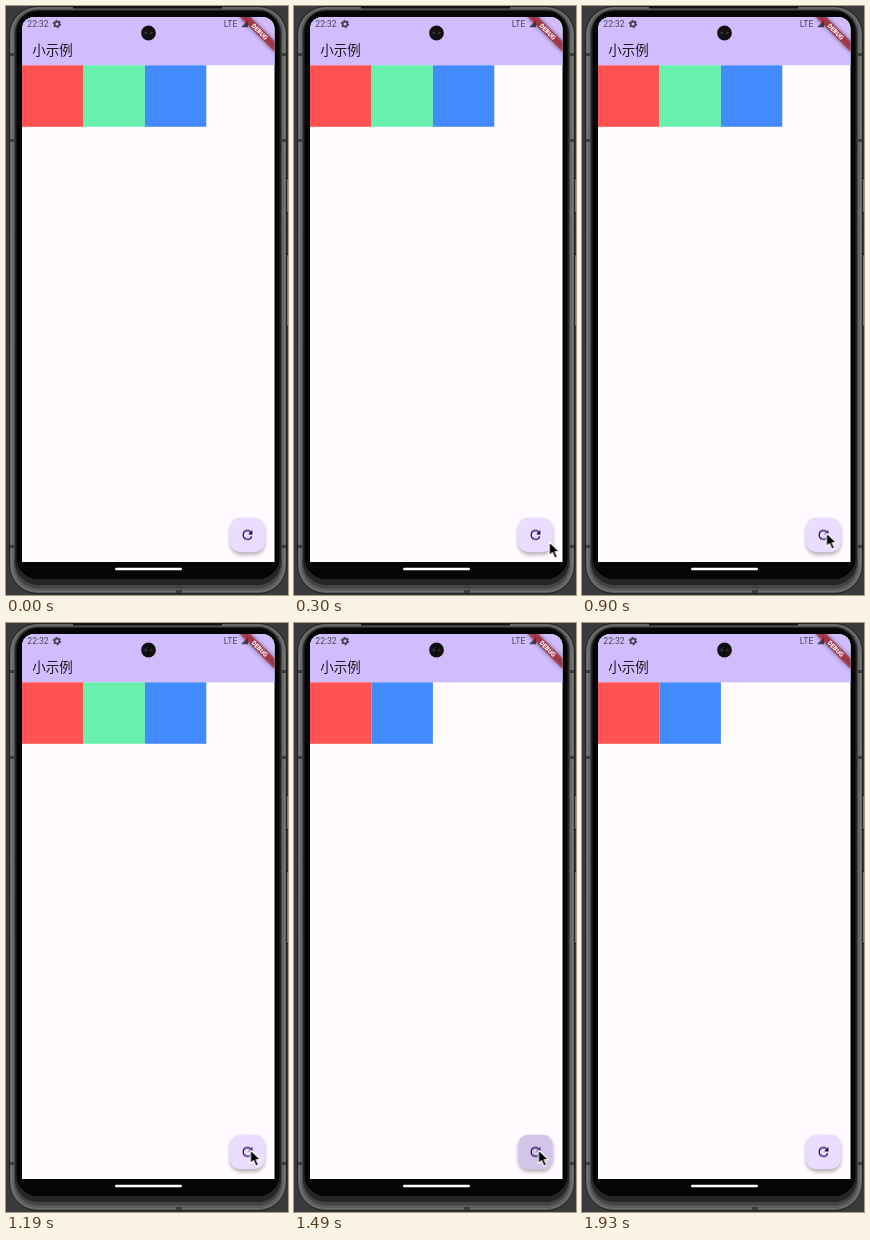
An HTML page for the animation above (4.87 s loop, 282 px wide and 589 px high).

```html
<!DOCTYPE html>
<html lang="zh-CN">
<head>
<meta charset="utf-8">
<title>小示例</title>
<style>
  html, body { margin: 0; width: 100%; height: 100%; overflow: hidden; background: #3a3a3c; }
  svg { display: block; width: 282px; height: 589px; }
  text { font-family: Roboto, sans-serif; }
  .title { font: 13.5px "Noto Sans CJK SC", "Noto Sans CJK", sans-serif; fill: #1d1b1e; }
  .status { font-size: 8.6px; fill: #4a4358; }
  .debug { font-size: 6.2px; font-weight: 900; fill: #fff; text-anchor: middle; }
  #cursor, #tap, #ripple, #pressed { opacity: 0; }
</style>
</head>
<body>
<svg viewBox="0 0 282 589">
  <defs>
    <linearGradient id="metal" x2="0" y2="1">
      <stop offset="0" stop-color="#565656"/>
      <stop offset=".05" stop-color="#6a6a6a"/>
      <stop offset=".95" stop-color="#666"/>
      <stop offset="1" stop-color="#595959"/>
    </linearGradient>
    <radialGradient id="ink" gradientUnits="userSpaceOnUse" cx="243" cy="529" r="19">
      <stop offset="0" stop-color="#cdbde6"/>
      <stop offset=".6" stop-color="#d3c4ea"/>
      <stop offset="1" stop-color="#e6d9fb"/>
    </radialGradient>
    <clipPath id="screen"><path d="M16 556V23a12 12 0 0 1 12-12H256.5a12 12 0 0 1 12 12V556Z"/></clipPath>
    <clipPath id="fabClip"><rect x="224.2" y="511.8" width="34.6" height="34.4" rx="9.8"/></clipPath>
    <filter id="soft" x="-50%" y="-50%" width="200%" height="200%"><feGaussianBlur stdDeviation="2"/></filter>
  </defs>

  <!-- device -->
  <rect width="282" height="589" fill="#3a3a3c"/>
  <g fill="#161616">
    <rect x="279.5" y="172" width="2.5" height="35"/>
    <rect x="279.5" y="248" width="2.5" height="73"/>
  </g>
  <path d="M281.5 173V206M281.5 249V320" stroke="#777"/>
  <rect x="3.5" y=".5" width="277" height="587" rx="28" fill="url(#metal)" stroke="#222"/>
  <rect x="5.5" y="2" width="273" height="583.5" rx="26" fill="none" stroke="#7b7b7b" stroke-width=".8"/>
  <rect x="8" y="3.5" width="268" height="579" rx="24" fill="#444"/>
  <rect x="9" y="4" width="266" height="575" rx="23" fill="#252525"/>
  <rect x="10.5" y="5" width="263" height="568" rx="21" fill="#050505"/>
  <path d="M67 1.5H216" stroke="#111" stroke-width="2"/>
  <g fill="#3b3b3b">
    <rect x="4" y="47" width="4" height="3"/>
    <rect x="4" y="133" width="4" height="3"/>
    <rect x="276" y="133" width="4" height="3"/>
    <rect x="276" y="47" width="4" height="3"/>
    <rect x="4" y="539" width="4" height="3"/>
    <rect x="276" y="539" width="4" height="3"/>
    <rect x="170" y="584" width="6" height="3"/>
  </g>
  <rect x="109" y="561.8" width="67" height="2.4" rx="1.2" fill="#fff"/>

  <!-- app -->
  <g clip-path="url(#screen)">
    <rect x="16" y="11" width="253" height="545" fill="#fffbff"/>
    <rect x="16" y="11" width="253" height="48.3" fill="#d1bcfe"/>
    <text class="status" x="21.3" y="21.2">22:32</text>
    <circle cx="51" cy="18" r="2.4" fill="none" stroke="#4a4358" stroke-width="1.7"/>
    <circle cx="51" cy="18" r="3.6" fill="none" stroke="#4a4358" stroke-width="1.2" stroke-dasharray="1.9 1.87"/>
    <text class="status" x="217.8" y="21.2">LTE</text>
    <path d="M235 21.2H242V14.2Z" fill="#4a4358"/>
    <text class="title" x="26.3" y="48.8">小示例</text>

    <rect x="16" y="59.3" width="61.5" height="61.5" fill="#ff5252"/>
    <rect id="middle" x="77.5" y="59.3" width="61.4" height="61.5" fill="#69f0ae"/>
    <rect id="last" x="138.9" y="59.3" width="61.4" height="61.5" fill="#448aff"/>

    <g transform="translate(268.5 11) rotate(45)">
      <rect x="-24.5" y="17.2" width="49" height="7.4" opacity=".5" filter="url(#soft)"/>
      <rect x="-24.5" y="17.2" width="49" height="7.4" fill="#b71c1c" fill-opacity=".63"/>
      <text class="debug" x="0" y="23.1">DEBUG</text>
    </g>
  </g>
  <circle cx="142.5" cy="27" r="7.4" fill="#101010"/>
  <circle cx="139.8" cy="27" r="1.5" fill="#333"/>
  <circle cx="145.2" cy="27" r="1.5" fill="#292929"/>

  <!-- button -->
  <rect x="224.5" y="514.5" width="34" height="34" rx="10" opacity=".34" filter="url(#soft)"/>
  <g clip-path="url(#fabClip)">
    <rect x="224" y="511" width="36" height="36" fill="#eaddff"/>
    <circle id="tap" cx="246.5" cy="526.5" r="10.3" fill="#dccdf3"/>
    <rect id="ripple" x="224" y="511" width="36" height="36" fill="url(#ink)"/>
    <rect id="pressed" x="224" y="511" width="36" height="36" fill="#d3c4eb"/>
  </g>
  <path transform="translate(234.1 521.6) scale(.613)" fill="#21005d"
    d="M17.65 6.35A7.96 7.96 0 0 0 12 4a8 8 0 1 0 7.73 10h-2.08A6 6 0 1 1 12 6c1.66 0 3.14.69 4.22 1.78L13 11h7V4Z"/>

  <g id="cursor">
    <path d="M1 .9V14.6L4.2 11.7 6.5 17.2 9.1 16.1 6.8 10.8H11.2Z" fill="#000" stroke="#fff" stroke-width="1.1" stroke-linejoin="round"/>
  </g>
</svg>
<script>
  const LOOP = 4870;

  // Hold each [time, style] step until the next one.
  function play(id, steps) {
    const frames = steps.map(([t, style]) => ({ ...style, offset: t / LOOP, easing: "step-end" }));
    frames.push({ ...steps[steps.length - 1][1], offset: 1 });
    document.getElementById(id).animate(frames, { duration: LOOP, iterations: Infinity });
  }

  const hide = { opacity: 0 };
  const show = { opacity: 1 };
  const at = (x, y) => ({ opacity: 1, transform: `translate(${x}px, ${y}px)` });
  const between = (id, from, to) => play(id, [[0, hide], [from, show], [to, hide]]);

  play("cursor", [
    [0, { opacity: 0, transform: "translate(268px, 545px)" }],
    [150, at(268, 545)],
    [300, at(254.3, 535)],
    [450, at(255, 534.3)],
    [600, at(248.4, 531)],
    [750, at(246, 528)],
    [900, at(243.4, 526)],
    [1780, at(249.3, 543.7)],
    [1930, { opacity: 0, transform: "translate(249px, 544px)" }]
  ]);
  between("tap", 1040, 1190);
  between("ripple", 1340, 1490);
  between("pressed", 1490, 1780);
  play("middle", [[0, { fill: "#69f0ae" }], [1340, { fill: "#448aff" }]]);
  play("last", [[0, show], [1340, hide]]);
</script>
</body>
</html>
```
